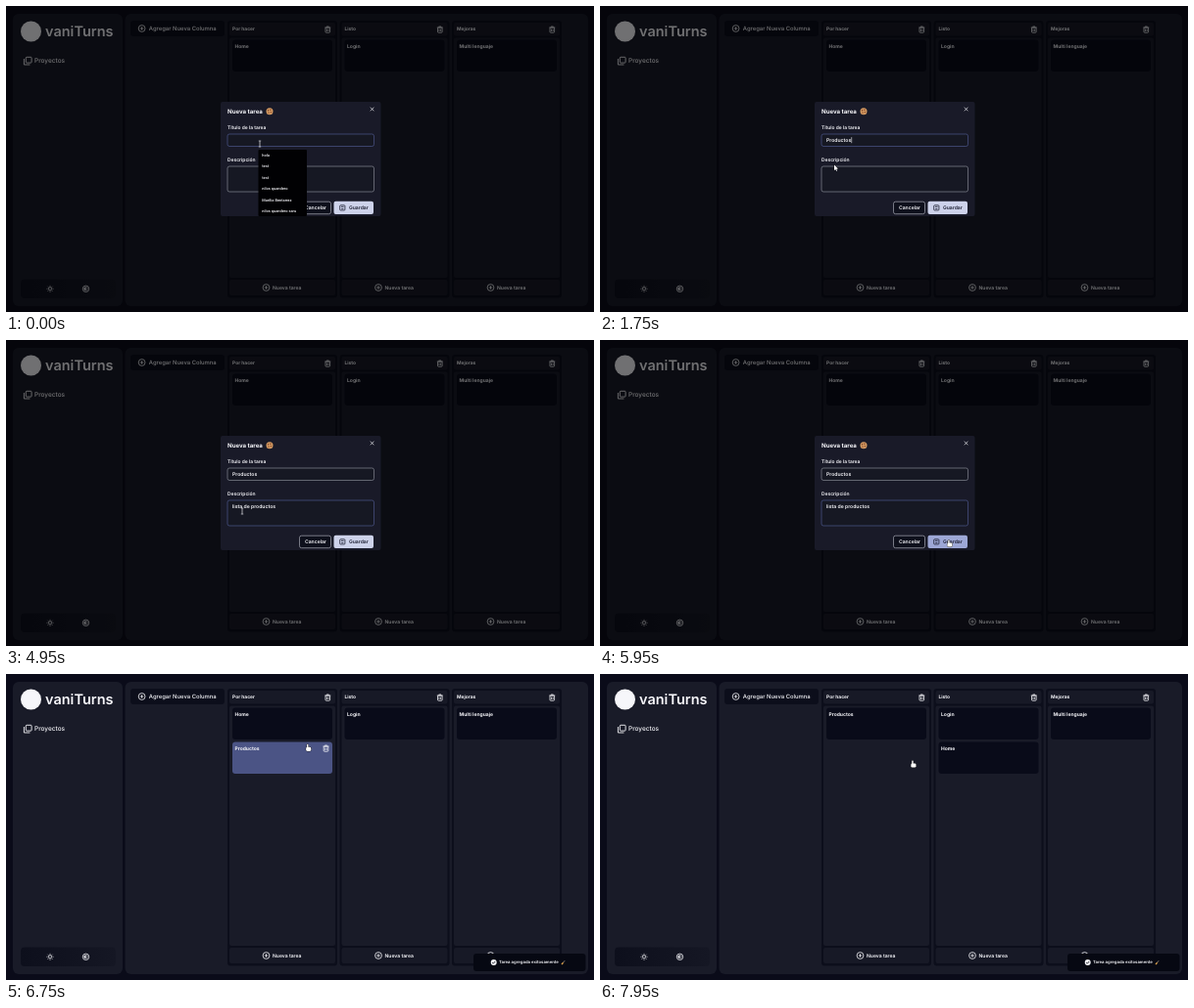
These frames come from a looping animation (600x313 px, 8000 ms). An HTML page with a canvas:

```html
<!DOCTYPE html>
<html lang="es">
<head>
<meta charset="utf-8">
<title>Tablero de tareas</title>
<style>
  html, body { margin: 0; width: 100%; height: 100%; overflow: hidden; background: #0a0b19; }
  canvas { display: block; width: 600px; height: 313px; }
</style>
</head>
<body>
<canvas id="stage"></canvas>
<script>
const W = 600, H = 313, LOOP = 8000, STEP = 50;
const cv = document.getElementById('stage');
const g = cv.getContext('2d');
const dpr = window.devicePixelRatio || 1;
cv.width = W * dpr;
cv.height = H * dpr;

const C = {
  back: '#0a0b19', panel: '#191b28', dark: '#0c0e1b', bar: '#171926', card: '#090b19',
  lit: '#4b5485', white: '#f6f6fa', focus: '#4d568c', line: '#858792', ink: '#1b1d30'
};
const FONT = 'Inter, "Open Sans", sans-serif';
const MENU_FONT = 'Roboto, "Open Sans", sans-serif';
const COLS = ['Por hacer', 'Listo', 'Mejoras'];
const colX = i => 226 + i * 114.5;
const slotY = i => 34.5 + i * 35;
const CARD = { w: 102, h: 32.5 };
const TITLE = { x: 226, y: 131, w: 149.5, h: 12.5 };
const AREA = { x: 226, y: 164, w: 149.5, h: 26 };
const CANCEL = { x: 299.5, y: 200.2, w: 32, h: 12.5 };
const SAVE = { x: 334.5, y: 199.8, w: 40.5, h: 13.2 };

// Moments in ms
const FOCUS = 2150, CLOSE = 6000, DRAG = 6950, ENTER = 7050, SWAP = 7400, DROP = 7550, LAND = 7750;

// Pointer moves; bend makes the vertical part lag behind
const home = { x: 259, y: 141 };
const moves = [
  { from: 1600, to: 1750, x: 239, y: 162.5 },
  { from: 1750, to: 2100, x: 241, y: 175 },
  { from: 5350, to: 5850, x: 356, y: 204.5 },
  { from: 6150, to: 6850, x: 305, y: 64 },
  { from: DRAG, to: DROP, x: 453, y: 150, bend: 2 },
  { from: DROP, to: 7950, x: 319, y: 88.5, bend: 2 }
];

// Earlier entries offered under the title field
const history = ['hola', 'test', 'test', 'nilos quandero', 'Marilia Bentarrez', 'nilos quandero saru',
  'prueba', 'primera', 'pro uno', 'prod', 'producto', 'productos'];

const clamp = v => Math.max(0, Math.min(1, v));
const mix = (a, b, k) => a + (b - a) * k;
const ease = (t, from, dur) => { const k = clamp((t - from) / dur); return k * k * (3 - 2 * k); };
const typed = (text, t, from, gap) => text.slice(0, Math.max(0, Math.floor((t - from) / gap) + 1));
const inside = (p, r) => p.x >= r.x && p.x <= r.x + r.w && p.y >= r.y && p.y <= r.y + r.h;

function pointer(t) {
  let { x, y } = home;
  for (const m of moves) {
    const k = ease(t, m.from, m.to - m.from);
    x = mix(x, m.x, k);
    y = mix(y, m.y, k ** (m.bend || 1));
  }
  return { x, y };
}

function box(x, y, w, h, r, fill, stroke, lw = 0.7) {
  g.beginPath();
  g.roundRect(x, y, w, h, r);
  if (fill) { g.fillStyle = fill; g.fill(); }
  if (stroke) { g.strokeStyle = stroke; g.lineWidth = lw; g.stroke(); }
}

function disc(x, y, r, fill) {
  g.beginPath();
  g.arc(x, y, r, 0, 7);
  g.fillStyle = fill;
  g.fill();
}

function ring(x, y, r, color = C.white, lw = 0.8) {
  g.beginPath();
  g.arc(x, y, r, 0, 7);
  g.strokeStyle = color;
  g.lineWidth = lw;
  g.stroke();
}

function lines(color, lw, ...list) {
  g.strokeStyle = color;
  g.lineWidth = lw;
  g.beginPath();
  for (const [x1, y1, x2, y2] of list) { g.moveTo(x1, y1); g.lineTo(x2, y2); }
  g.stroke();
}

// y is the middle of the lowercase letters
function text(s, x, y, size, weight = 600, color = C.white, font = FONT) {
  g.font = `${weight} ${size}px ${font}`;
  g.fillStyle = color;
  g.fillText(s, x, y + size * 0.32);
  return g.measureText(s).width;
}

function plus(x, y) {
  ring(x, y, 3.4);
  lines(C.white, 0.8, [x - 1.7, y, x + 1.7, y], [x, y - 1.7, x, y + 1.7]);
}

function trash(x, y) {
  lines(C.white, 0.8, [x - 3, y - 2, x + 3, y - 2], [x - 1.2, y - 3, x + 1.2, y - 3]);
  for (const d of [-0.8, 0.8]) lines(C.white, 0.8, [x + d, y - 0.3, x + d, y + 1.8]);
  box(x - 2.3, y - 2, 4.6, 5.2, 0.8, null, C.white, 0.8);
}

function sun(x, y) {
  ring(x, y, 1.6);
  for (let a = 0; a < 6.2; a += Math.PI / 4) {
    const c = Math.cos(a), s = Math.sin(a);
    lines(C.white, 0.7, [x + c * 2.5, y + s * 2.5, x + c * 3.5, y + s * 3.5]);
  }
}

function moon(x, y) {
  ring(x, y, 3.2);
  ring(x, y, 1.7, C.white, 0.5);
  g.beginPath();
  g.arc(x, y, 1.7, Math.PI / 2, Math.PI * 1.5);
  g.fillStyle = C.white;
  g.fill();
}

function sidebar() {
  box(7, 8, 112, 299, 6, C.panel);
  disc(25.5, 26, 10.5, C.white);
  text('vaniTurns', 40, 26.6, 14.5, 600);
  box(20.3, 52.3, 5.8, 5.8, 0.8, null, C.white, 0.9);
  lines(C.white, 0.9, [18.4, 54, 18.4, 60], [18.4, 60, 24.4, 60]);
  text('Proyectos', 29, 56, 6.5, 500);
  const fade = g.createLinearGradient(15, 0, 112, 0);
  fade.addColorStop(0, '#0d0f1c');
  fade.addColorStop(1, '#151724');
  box(15, 279.5, 97, 19.5, 4, fade);
  sun(45, 289.3);
  moon(81.5, 289.3);
}

function column(name, i) {
  const x = colX(i);
  box(x, 15, 112, 283.5, 3, C.dark);
  box(x + 2, 17, 108, 13.5, 2, C.bar);
  box(x + 2, 32.5, 108, 245.5, 2, C.panel);
  box(x + 2, 280, 108, 16, 2, C.bar);
  text(name, x + 5, 23.8, 4.9, 700);
  trash(x + 102.3, 24);
  plus(x + 39.5, 288);
  text('Nueva tarea', x + 46, 288, 5.05);
}

function card(name, x, y, lit, alpha = 1) {
  g.save();
  g.globalAlpha = alpha;
  box(x, y, CARD.w, CARD.h, 3, lit ? C.lit : C.card);
  text(name, x + 2.5, y + 7.2, 5, 700);
  if (lit) trash(x + 95.5, y + 6.5);
  g.restore();
}

function cards(t, p) {
  const x = i => colX(i) + 5;
  const hover = (cx, cy) => t > CLOSE + 150 && t < DRAG && inside(p, { x: cx, y: cy, ...CARD });
  const away = ease(t, ENTER, 150);
  card('Login', x(1), slotY(away - ease(t, SWAP, 150)));
  card('Multi lenguaje', x(2), slotY(0));
  if (t >= CLOSE) {
    const y = slotY(1 - away);
    card('Productos', x(0), y, hover(x(0), y));
  }
  const hx = x(t < ENTER ? 0 : 1), hy = slotY(t < SWAP ? 0 : 1);
  const held = t >= DRAG && t < LAND;
  card('Home', hx, hy, hover(hx, hy), held ? 0.28 : 1);
  if (held) {
    const at = pointer(Math.min(t, DROP)), k = ease(t, DROP, LAND - DROP);
    card('Home', mix(at.x - 74, hx, k), mix(at.y - 29.5, hy, k), true);
  }
}

function toast(t) {
  if (t < CLOSE + 50) return;
  const y = 295 + mix(30, 0, ease(t, CLOSE + 50, 150));
  box(477, y - 9, 114.5, 18, 3, '#060812');
  disc(497.7, y, 3, C.white);
  lines('#060812', 0.8, [496.2, y, 497.3, y + 1.2], [497.3, y + 1.2, 499.2, y - 1]);
  text('Tarea agregada exitosamente', 503, y, 4.25);
  lines('#d9a04c', 1.3, [567, y + 2, 568.6, y + 0.2]);
  lines('#e8d9c0', 0.7, [568.8, y - 0.2, 570, y - 1.6]);
}

function field(r, value, focused, y, caret) {
  box(r.x, r.y, r.w, r.h, 2, '#161823', focused ? C.focus : C.line);
  const w = text(value, 231, y, 5.1);
  if (focused && value && caret) lines(C.white, 0.6, [231.5 + w, y - 3, 231.5 + w, y + 3]);
}

function menu(value) {
  if (value === 'Productos') return;
  const key = value.toLowerCase();
  const rows = history.filter(s => s.startsWith(key)).slice(0, 6);
  box(257.5, 147, 49.5, rows.length * 11.5 - 1, 1, '#010103');
  rows.forEach((s, i) => text(s, 261.3, 152.6 + i * 11.5, 3.95, 500, C.white, MENU_FONT));
}

function cookie(x, y) {
  disc(x, y, 3.5, '#d39a62');
  for (let a = 0.6; a < 6.2; a += Math.PI / 2) disc(x + Math.cos(a) * 1.7, y + Math.sin(a) * 1.7, 0.7, '#7a3a20');
}

function modal(t, p) {
  const title = typed('Productos', t, 50, 181);
  const note = typed('lista de productos', t, 2550, 133);
  const onTitle = t < FOCUS;
  g.fillStyle = 'rgba(0,0,0,.54)';
  g.fillRect(0, 0, W, H);
  box(219, 98, 163.5, 117, 2, '#191a28');
  text('Nueva tarea', 226, 107.9, 6.1, 700);
  cookie(269, 107.7);
  lines(C.white, 0.7, [371.8, 103.7, 375.4, 107.3], [375.4, 103.7, 371.8, 107.3]);
  text('Título de la tarea', 226, 124.6, 4.9);
  field(TITLE, title, onTitle, 137.2, true);
  text('Descripción', 226, 157.7, 4.95);
  field(AREA, note, !onTitle, 170.2, note.length < 18);
  box(CANCEL.x, CANCEL.y, CANCEL.w, CANCEL.h, 2, '#0e101c', '#a6a8b4');
  text('Cancelar', 305, 206.4, 5.05);
  box(SAVE.x, SAVE.y, SAVE.w, SAVE.h, 2, inside(p, SAVE) ? '#9da7d6' : '#cdd2ea');
  box(340.7, 203.8, 5.2, 5.2, 0.8, null, C.ink, 0.8);
  lines(C.ink, 0.8, [342, 205.4, 344.6, 205.4], [342.2, 207.5, 344.4, 207.5]);
  text('Guardar', 350, 206.4, 5.05, 600, C.ink);
  menu(title);
}

function arrow({ x, y }) {
  g.beginPath();
  g.moveTo(x, y);
  g.lineTo(x, y + 5.6);
  g.lineTo(x + 1.6, y + 4.4);
  g.lineTo(x + 3.9, y + 4);
  g.closePath();
  g.strokeStyle = '#111';
  g.lineWidth = 0.9;
  g.stroke();
  g.fillStyle = '#fff';
  g.fill();
  lines('#fff', 1, [x + 1.6, y + 4, x + 2.6, y + 6.2]);
}

function hand({ x, y }) {
  for (const edge of ['#111', null]) {
    box(x - 0.7, y, 1.3, 5, 0.6, '#fff', edge, 0.9);
    box(x - 1.6, y + 2.9, 5, 4.2, 1.4, '#fff', edge, 0.9);
  }
}

function beam({ x, y }) {
  lines('#e4e4ea', 0.7, [x, y - 2.8, x, y + 2.8]);
  for (const d of [-3, 3]) lines('#e4e4ea', 0.7, [x - 1.2, y + d, x + 1.2, y + d]);
}

function drawPointer(t, p) {
  if (t >= CLOSE || inside(p, SAVE) || inside(p, CANCEL)) hand(p);
  else if (inside(p, TITLE) || inside(p, AREA)) beam(p);
  else arrow(p);
}

function draw(t) {
  const p = pointer(t);
  g.setTransform(dpr, 0, 0, dpr, 0, 0);
  g.textRendering = 'geometricPrecision';
  g.fillStyle = C.back;
  g.fillRect(0, 0, W, H);
  sidebar();
  box(121.5, 8, 472.5, 299, 6, C.panel);
  box(127, 15, 96, 16, 3, C.dark);
  plus(138.6, 23);
  text('Agregar Nueva Columna', 145.8, 23, 5.9, 500);
  COLS.forEach(column);
  cards(t, p);
  toast(t);
  if (t < CLOSE) modal(t, p);
  drawPointer(t, p);
}

const start = performance.now();
function tick() {
  const t = (performance.now() - start) % LOOP;
  draw(Math.floor(t / STEP) * STEP);
  requestAnimationFrame(tick);
}
tick();
</script>
</body>
</html>
```
